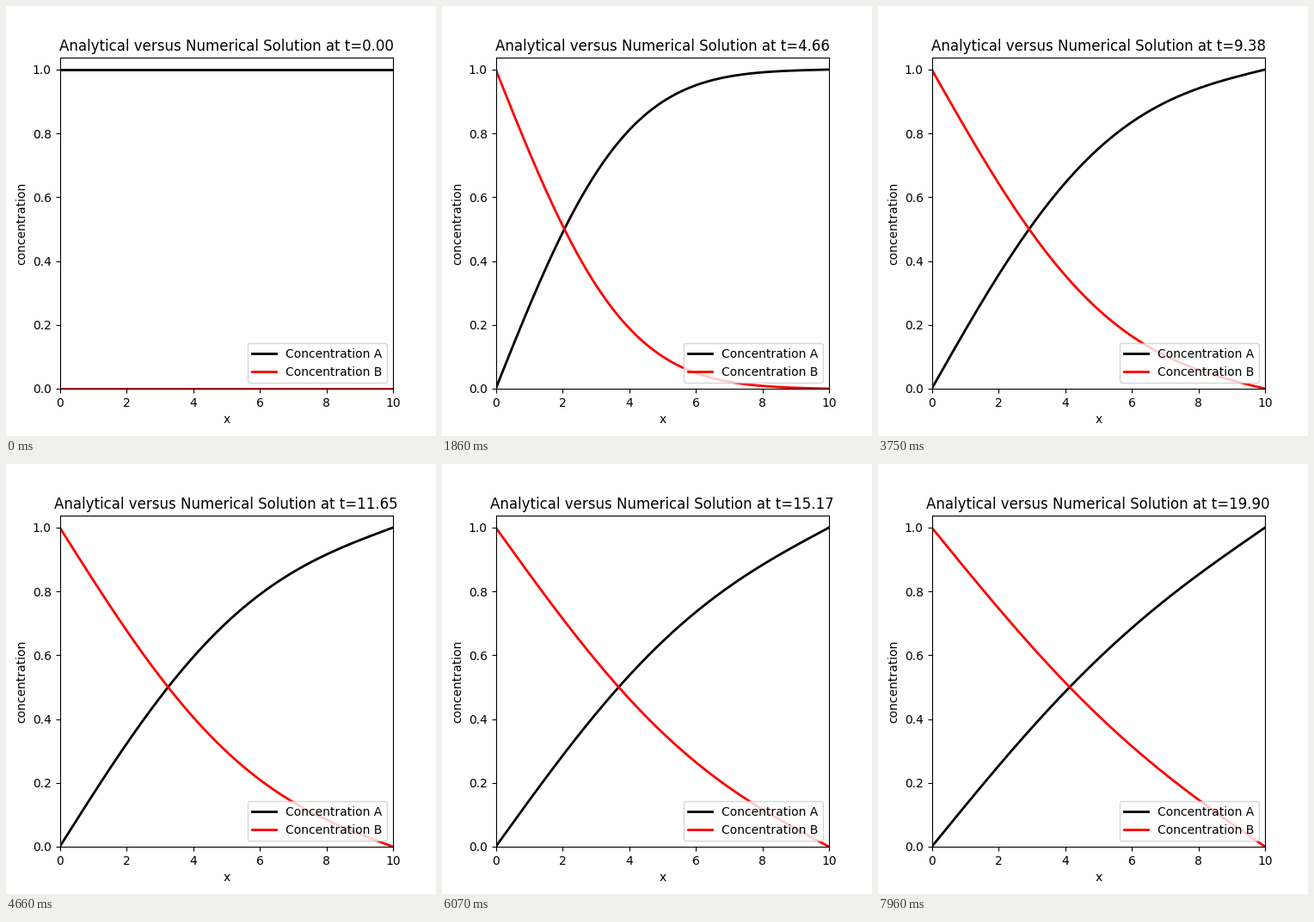
A matplotlib script for the animation above (7990 ms loop, 500 by 500 pixels).

```python
import numpy as np
import matplotlib.pyplot as plt
from matplotlib.animation import FuncAnimation

LENGTH = 10.0        # domain size, diffusivity is 1
DT = 40 / 601        # model time between two states
MS_PER_UNIT = 400    # playback speed
STATES = 300
FRAMES, INTERVAL = 470, 17

x = np.linspace(0, LENGTH, 401)
k = np.arange(1, 121) * np.pi / LENGTH
modes = 2 / (k * LENGTH) * np.sin(np.outer(x, k))


def conc_b(t):
    """Diffusion from a fixed value 1 at x=0 towards 0 at x=LENGTH."""
    if t == 0:
        return np.zeros_like(x)
    return 1 - x / LENGTH - modes @ np.exp(-k**2 * t)


def time_at(frame):
    """Model time held on screen around the middle of a frame."""
    ms = frame * INTERVAL + 14
    state = int(ms / (DT * MS_PER_UNIT))
    return min(state, STATES - 1) * DT


fig, ax = plt.subplots(figsize=(5, 5), dpi=100)
line_a, = ax.plot(x, np.ones_like(x), color="black", lw=2, label="Concentration A")
line_b, = ax.plot(x, np.zeros_like(x), color="red", lw=2, label="Concentration B")
ax.set_xlim(0, LENGTH)
ax.set_ylim(0, 1.0375)
ax.set_xlabel("x")
ax.set_ylabel("concentration")
ax.legend(loc="lower right")
title = ax.set_title("")


def update(frame):
    t = time_at(frame)
    b = conc_b(t)
    line_a.set_ydata(1 - b)
    line_b.set_ydata(b)
    title.set_text(f"Analytical versus Numerical Solution at t={t:.2f}")
    return line_a, line_b, title


def init():
    return update(0)


anim = FuncAnimation(fig, update, frames=FRAMES, init_func=init,
                     interval=INTERVAL, repeat=True, repeat_delay=0, blit=False)
plt.show()
```
